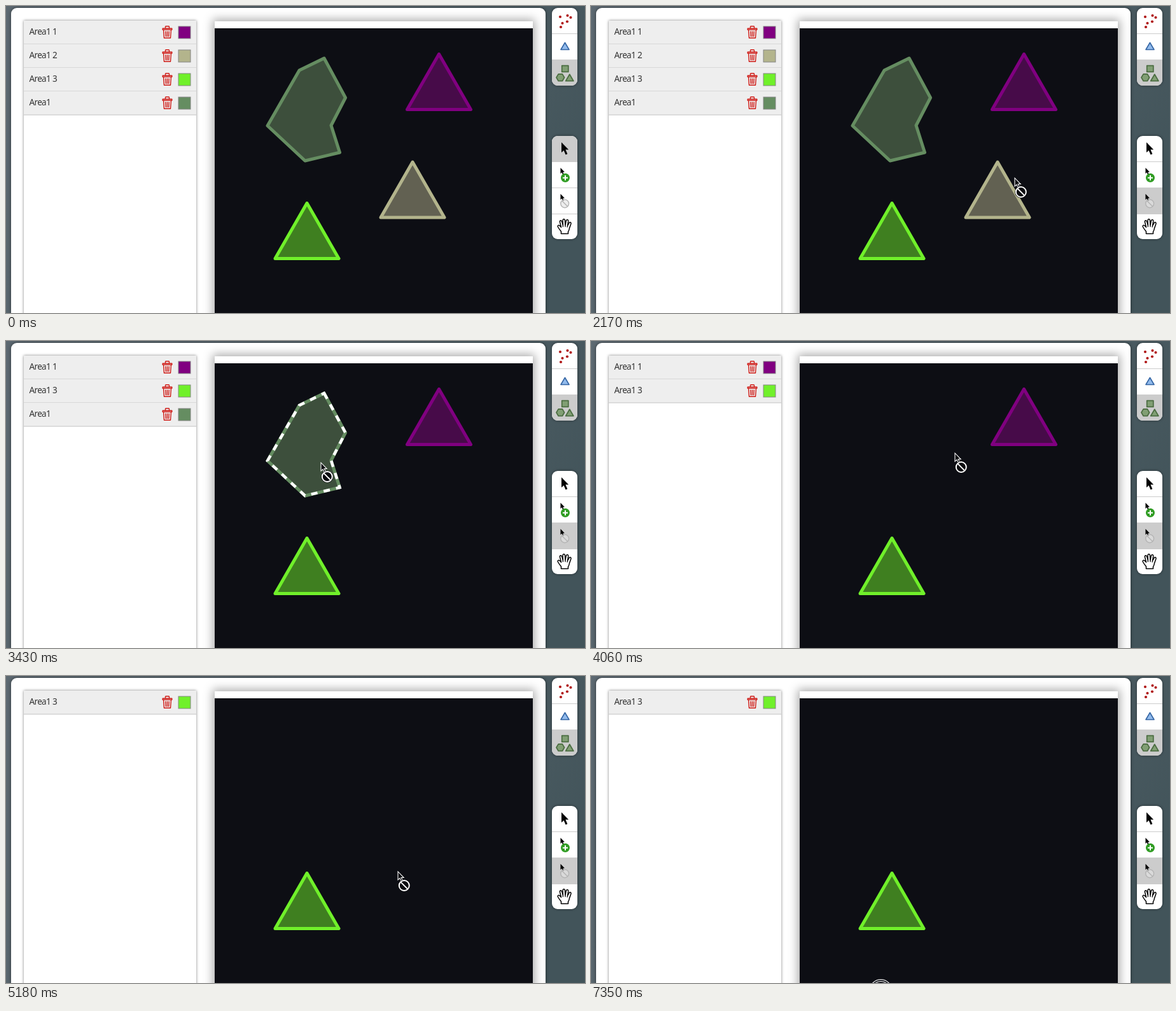
An HTML page for the animation above (7.42 s loop, 910 by 482 pixels).

```html
<!DOCTYPE html>
<html lang="en">
<head>
<meta charset="utf-8">
<title>Area removal</title>
<style>
  html, body { margin: 0; width: 100%; height: 100%; overflow: hidden; }
  .stage {
    position: relative; width: 910px; height: 482px; overflow: hidden;
    background: linear-gradient(120deg, #5d6971, #55636a 45%, #42545a 90%);
  }
  .stage > * { position: absolute; box-sizing: border-box; }
  .panel { left: 8px; top: 3px; width: 840px; height: 520px; border-radius: 9px; background: #fff; box-shadow: 0 0 5px rgba(0, 0, 0, .5); }
  .list { left: 28px; top: 23px; width: 271px; height: 500px; background: #fff; box-shadow: 0 0 4px rgba(0, 0, 0, .5); }
  .canvas { left: 328px; top: 24px; width: 500px; height: 500px; background: #0d0e14; border-top: 11px solid #fff; box-shadow: 0 0 14px 3px rgba(0, 0, 0, .34); }
  .tools { left: 858px; width: 40px; border-radius: 9px; overflow: hidden; background: #fff; box-shadow: 0 0 4px rgba(0, 0, 0, .45); }
  .tools i { display: block; box-sizing: border-box; height: 41px; border-bottom: 1px solid #ccc; }
  .tools i:last-child { border: 0; }
  .tools .on { background: #ccc; }
  svg { left: 0; top: 0; }
  text { font: 13.5px "Noto Sans", "Open Sans", sans-serif; letter-spacing: -.65px; fill: #333; }
  .area { stroke-width: 5; stroke-linejoin: round; }
  .dash { fill: none; stroke: #fff; stroke-width: 4.5; stroke-dasharray: 10 10; }
</style>
</head>
<body>
<div class="stage">
  <div class="panel"></div>
  <div class="list"></div>
  <div class="canvas"></div>
  <div class="tools" style="top:3px;height:122px"><i></i><i></i><i class="on"></i></div>
  <div class="tools" style="top:204px;height:162px"><i id="pick"></i><i></i><i id="remove"></i><i></i></div>

  <svg width="910" height="482" viewBox="0 0 910 482">
    <defs>
      <path id="arrow" d="M0 0V16L3.6 12.7 6.6 19.4 9.4 18.2 6.4 11.6H11.2Z"/>
      <g id="trash" fill="none" stroke="#cf1b16" stroke-width="1.4" stroke-linejoin="round">
        <path d="M.7 4.2H15.3V6.2H.7ZM5 4V1.6Q5 .8 5.8 .8H10.2Q11 .8 11 1.6V4M2 6.4 3 19.3H13L14 6.4"/>
        <path d="M5.3 8.5 5.8 17.3M8 8.5V17.3M10.7 8.5 10.2 17.3"/>
      </g>
    </defs>

    <g id="rows"></g>
    <g id="areas"></g>

    <g id="dots" fill="#b01818"></g>
    <path d="M878.5 57.5 885 68.5H872Z" fill="#92bbec" stroke="#3465a4" stroke-width="1.6" stroke-linejoin="round"/>
    <g fill="#819f74" stroke="#4a6c40" stroke-width="1.7" stroke-linejoin="round">
      <path d="M873.7 93.6H883.8V103.4H873.7Z"/>
      <path d="M865 112.3 868.2 106.9H874.4L877.6 112.3 874.4 117.7H868.2Z"/>
      <path d="M885.8 107.3 891.9 117.7H879.7Z"/>
    </g>

    <use href="#arrow" x="873" y="214"/>
    <use href="#arrow" transform="translate(871.5 254) scale(.58)"/>
    <circle cx="879" cy="269.8" r="7" fill="#2f9c22"/>
    <path d="M875 269.8H883M879 265.8V273.8" stroke="#fff" stroke-width="2"/>
    <use href="#arrow" transform="translate(871.5 295) scale(.58)"/>
    <g fill="none" stroke="#b4b4b4" stroke-width="1.4">
      <circle cx="878.2" cy="310.3" r="6.4" fill="#e2e2e2" fill-opacity=".6"/>
      <path d="M873.7 305.8 882.7 314.8"/>
    </g>
    <path fill="#fff" stroke="#000" stroke-width="1.5" stroke-linejoin="round" stroke-linecap="round"
      d="M872.5 357.5V354Q869.5 350.5 867.5 347Q866.6 344.8 868.4 344.3Q870 344 872.6 347.4L870.4 338.8Q870.3 336.7 872 336.7Q873.2 336.8 873.7 338.6L875.4 344.3 875 336.5Q875.2 334.6 876.8 334.6Q878.3 334.7 878.5 336.6L879 344 880.5 336.8Q881.2 335.2 882.6 335.5Q884 336 883.7 338L882.6 345 885.2 340.3Q886.3 339 887.5 339.8Q888.5 340.6 887.8 342.5L885.5 349Q885 352.5 883.5 354.5V357.5Z"/>
    <path d="M875.4 344V347M879 344V347M882.6 345 882 347.5" stroke="#000" stroke-width="1.2"/>

    <g id="ring" fill="none">
      <circle stroke="#fff" stroke-width="4"/>
      <circle stroke="#22242a" stroke-width="2"/>
    </g>
    <g id="cursor">
      <use id="plain" href="#arrow" transform="scale(.85)" stroke="#fff" stroke-width="1.2"/>
      <g id="deny">
        <use href="#arrow" transform="scale(.82)" fill="#0b0c10" stroke="#fff" stroke-width="1.3"/>
        <circle cx="9.8" cy="22" r="9.6" fill="#0b0c10"/>
        <circle cx="9.8" cy="22" r="8" fill="none" stroke="#fff" stroke-width="2"/>
        <path d="M4.2 16.4 15.4 27.6" stroke="#fff" stroke-width="2"/>
      </g>
    </g>
  </svg>
</div>

<script>
const LOOP = 7420, STEP = 70, DENY_FROM = 1610;
const $ = id => document.getElementById(id);
const triangle = (x, y) => `${x},${y} ${x + 50},${y + 87} ${x - 50},${y + 87}`;

// hover: time of the dashed outline, gone: time of removal
const areas = [
  { name: 'Area1 1', line: '#800080', fill: '#470b49', points: triangle(680.5, 75.5), hover: 4270, gone: 4690 },
  { name: 'Area1 2', line: '#b3b48c', fill: '#626152', points: triangle(639, 245), hover: 2380, gone: 3010 },
  { name: 'Area1 3', line: '#70f02a', fill: '#3f7f20', points: triangle(473, 309.5) },
  { name: 'Area1', line: '#658d61', fill: '#3d4f3c', hover: 3360, gone: 3850,
    points: '500,82 533.5,144 511,187.5 524.5,230 470,243 411,188 461,101' }
];

// time, x, y of the pointer tip
const path = [
  [840, 586, 382], [1120, 838, 372], [1610, 838, 371], [1750, 818, 358],
  [2030, 685, 276], [2170, 666, 270], [2310, 666, 270], [2730, 650, 300],
  [3220, 650, 300], [3430, 495, 191], [3640, 476, 180], [3920, 476, 180],
  [4060, 572, 176], [4270, 670, 147], [4480, 686, 143], [4830, 686, 143],
  [5110, 622, 295], [5180, 616, 307], [5460, 616, 307], [5530, 616, 308],
  [5670, 616, 308], [6440, 557, 330], [6650, 452, 466], [6720, 452, 466],
  [7070, 453, 483], [7350, 455.5, 494]
];

// from, to, radius of the click ring
const rings = [
  [1330, 1470, 23], [2800, 2870, 23], [2870, 3010, 41], [3710, 3780, 23],
  [3780, 3850, 41], [4620, 4690, 23], [4690, 4760, 41], [7350, 7420, 16]
];

function make(tag, attrs, parent) {
  const el = document.createElementNS('http://www.w3.org/2000/svg', tag);
  for (const key in attrs) el.setAttribute(key, attrs[key]);
  return parent.appendChild(el);
}

const show = (el, on) => { el.style.display = on ? '' : 'none'; };

for (const [cx, cy] of [[871, 17], [882.5, 15], [887.5, 18], [882, 24.5], [874.5, 27], [872, 33]])
  make('circle', { cx, cy, r: 2.1 }, $('dots'));

for (const a of areas) {
  a.row = make('g', {}, $('rows'));
  make('rect', { x: 28, y: 0, width: 271, height: 37, fill: '#eee' }, a.row);
  make('rect', { x: 28, y: 36.5, width: 271, height: 1, fill: '#c4c4c4' }, a.row);
  make('text', { x: 36.5, y: 21.5 }, a.row).textContent = a.name;
  make('use', { href: '#trash', x: 245.5, y: 8 }, a.row);
  make('rect', { x: 271, y: 9, width: 19, height: 19, fill: a.line, stroke: '#858585' }, a.row);
  a.shape = make('polygon', { class: 'area', points: a.points, fill: a.fill, stroke: a.line }, $('areas'));
  a.dash = make('polygon', { class: 'dash', points: a.points }, $('areas'));
}

function pointerAt(t) {
  const i = path.findIndex(p => p[0] > t);
  if (i === 0) return path[0].slice(1);
  if (i < 0) return path[path.length - 1].slice(1);
  const [t0, x0, y0] = path[i - 1], [t1, x1, y1] = path[i];
  const k = (t - t0) / (t1 - t0);
  return [x0 + (x1 - x0) * k, y0 + (y1 - y0) * k];
}

function draw(t) {
  let y = 23;
  for (const a of areas) {
    const alive = !(t >= a.gone);
    show(a.row, alive);
    show(a.shape, alive);
    show(a.dash, alive && t >= a.hover);
    if (alive) {
      a.row.setAttribute('transform', `translate(0 ${y})`);
      y += 37;
    }
  }

  const removing = t >= DENY_FROM;
  $('pick').className = removing ? '' : 'on';
  $('remove').className = removing ? 'on' : '';

  const [px, py] = pointerAt(t);
  const place = `translate(${px} ${py})`;
  $('cursor').setAttribute('transform', place);
  show($('cursor'), t >= path[0][0]);
  show($('plain'), !removing);
  show($('deny'), removing);

  const ring = rings.find(([from, to]) => t >= from && t < to);
  show($('ring'), ring);
  if (ring) {
    $('ring').setAttribute('transform', place);
    for (const c of $('ring').children) c.setAttribute('r', ring[2]);
  }
}

const start = performance.now();
function tick() {
  const t = (performance.now() - start) % LOOP;
  draw(Math.floor(t / STEP) * STEP);
  requestAnimationFrame(tick);
}
tick();
</script>
</body>
</html>
```
